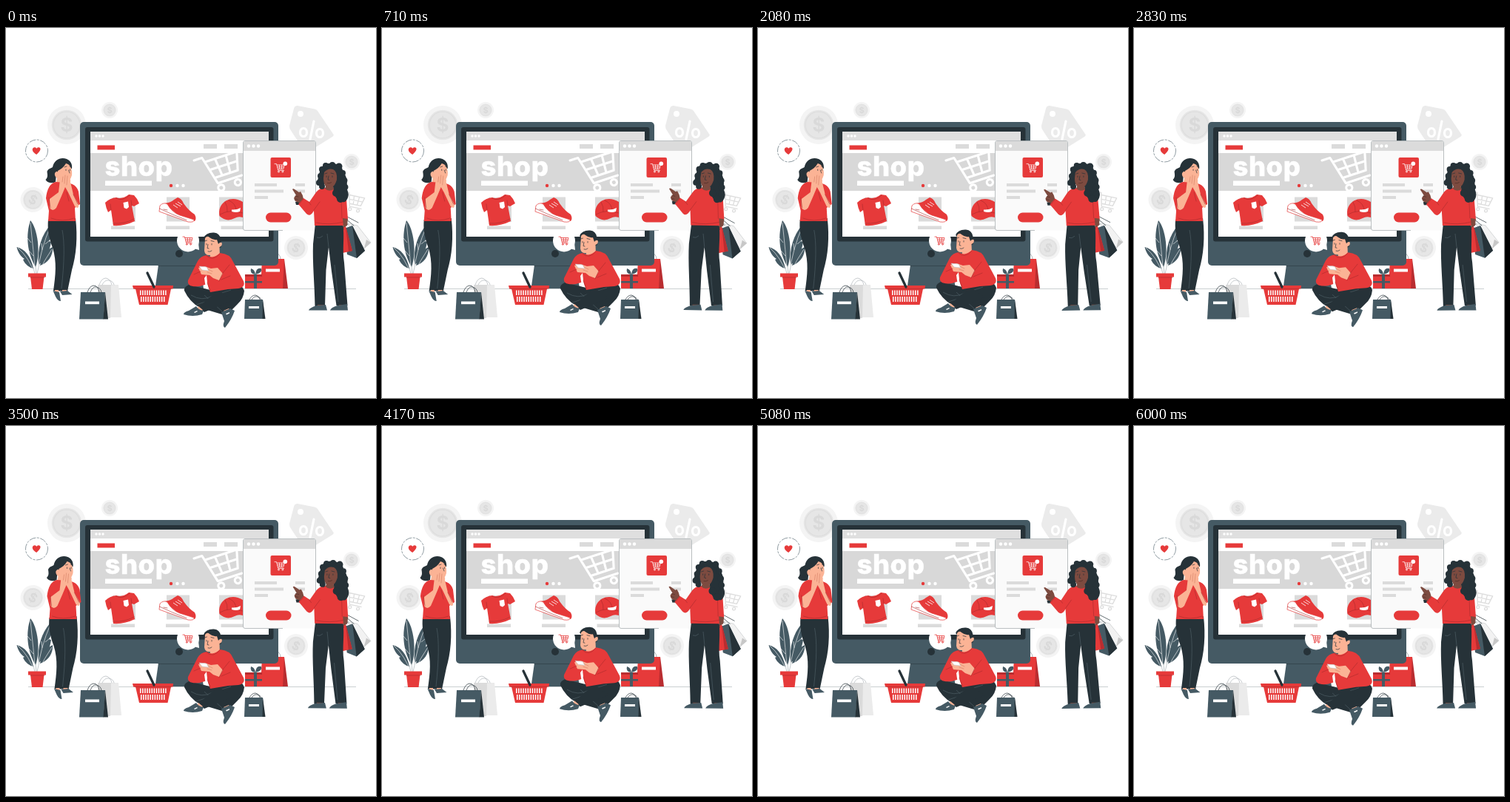
Recreate the animation shown at these times as an HTML page. Size 500 by 500 pixels, loop 6040 ms.

```html
<!DOCTYPE html>
<html lang="en">
<head>
<meta charset="utf-8">
<title>Online shop</title>
<style>
  html, body { margin: 0; width: 100%; height: 100%; overflow: hidden; background: #fff; }
  svg { display: block; width: 100%; height: 100%; }
  .red { fill: #e63a3a; } .deep { fill: #b92d30; } .slate { fill: #455a64; } .dark { fill: #263238; }
  .pale { fill: #ebebeb; } .grey { fill: #dbdbdb; } .white { fill: #fff; }
  .skin { fill: #fbb395; } .brown { fill: #7d4b40; }
  .line { fill: none; stroke: #263238; stroke-width: .7; stroke-linecap: round; stroke-linejoin: round; }
  .fold { fill: none; stroke: #a92a2d; stroke-width: .6; stroke-linecap: round; }
  .seam { fill: none; stroke: #52636b; stroke-width: .6; }
  .thin { fill: none; stroke: #fff; stroke-width: .8; }
  .coin { font: 700 10px Inter, Arial, sans-serif; text-anchor: middle; fill: #d9d9d9; }
  .shop { font: 800 36.500px Inter, "Open Sans", sans-serif; letter-spacing: .5px; fill: #fff; stroke: #fff; stroke-width: .4; }
</style>
</head>
<body>
<svg viewBox="0 0 500 500" xmlns="http://www.w3.org/2000/svg">
  <defs>
    <g id="coin">
      <circle r="10" fill="#f4f4f4"/><circle r="7.8" fill="#e6e6e6"/>
      <circle r="6.9" fill="none" stroke="#dedede" stroke-width=".5"/>
      <text class="coin" y="3.6">$</text>
    </g>
    <g id="cart" fill="none" stroke-linecap="round" stroke-linejoin="round">
      <path d="M0 3H7L13 27H34M8 7H36L32 22H12M17 7l1.5 15M26.5 7l-1 15M10 14.5H34"/>
      <circle cx="14.500" cy="31.500" r="2.500"/><circle cx="29" cy="31.500" r="2.500"/>
    </g>
  </defs>

  <!-- backdrop -->
  <use href="#coin" transform="translate(82 131) scale(2.6)"/>
  <use href="#coin" transform="translate(140 111) scale(1.1)"/>
  <use href="#coin" transform="translate(36.500 232) rotate(28) scale(1.7)"/>
  <use href="#coin" transform="translate(467 181) scale(1.1)"/>
  <use href="#coin" transform="translate(392 297) rotate(25) scale(1.6)"/>
  <path class="pale" d="M394 105L417 109.500Q420 110 421 112L442 143Q444 145 441 147L409 167Q405 169 403 166L384 137Q383 135 383 132L389 109Q390 105 394 105Z"/>
  <circle class="white" cx="398" cy="116" r="4"/>
  <g fill="none" stroke="#fff" stroke-width="3.2" stroke-linecap="round">
    <ellipse cx="402" cy="141" rx="4.5" ry="5.5"/><ellipse cx="424" cy="142" rx="4.5" ry="5.5"/><path d="M416 126L411 150"/>
  </g>
  <use href="#cart" transform="translate(459 219) rotate(12) scale(.76)" stroke="#dedede" stroke-width="1.8"/>
  <path d="M30 352.5H473" stroke="#b4babd" stroke-width=".7"/>

  <path class="line" d="M356 312Q358 304 364 304Q370 304 371 312" style="stroke:#8b9498"/>
  <path class="red" d="M346 312H376V352H344Z"/><path class="deep" d="M376 312L381 352H374Z"/>
  <rect class="white" x="351" y="325.5" width="19" height="4"/>

  <!-- monitor -->
  <path class="slate" d="M206 320H262L267 352H201.500Z"/><path class="line" d="M206 321.200H262"/>
  <rect class="slate" x="100" y="127" width="268" height="194" rx="5"/>
  <rect class="dark" x="107" y="134" width="254.500" height="154.500" rx="3"/>
  <rect class="white" x="114" y="140" width="241" height="142"/>
  <rect x="114" y="140" width="241" height="12" fill="#dfdfdf"/>
  <g class="white"><circle cx="122" cy="146" r="1.7"/><circle cx="126.5" cy="146" r="1.7"/><circle cx="131" cy="146" r="1.7"/></g>
  <rect class="red" x="123.5" y="158.500" width="23.5" height="6"/>
  <path class="grey" d="M267 157h18v6h-18zM295 157h18v6h-18z"/>
  <path d="M114 169H355V220H114Z" fill="#d8d8d8"/>
  <text class="shop" x="133.500" y="200">shop</text>
  <rect class="white" x="134" y="206.5" width="63" height="6.5"/>
  <circle class="red" cx="223" cy="213" r="2.2"/>
  <circle class="white" cx="231.5" cy="213" r="2.2"/><circle class="white" cx="239.5" cy="213" r="2.2"/>
  <use href="#cart" transform="translate(254 179) rotate(-18) scale(1.63) translate(0 -3)" stroke="#fff" stroke-width="1.9"/>
  <circle class="dark" cx="234" cy="305" r="5"/>

  <!-- products -->
  <path class="grey" d="M144 229h31v33h-31zM217 228.5h31v33h-31zM288 228.5h32v33h-32zM142 267.5h32v4.5h-32zM216 267.5h32v4.5h-32zM290.5 267.5h31v4.5h-31z"/>
  <path class="red" d="M149 229Q157 232 166 225L173 226Q178 231 180 237L173 241L170 240L174 261Q160 268 145 267L142 246L138 249Q135 243 134 236Q140 230 149 229Z"/>
  <path class="fold" d="M149 230Q158 235 167 226M142 246L141 238M170 240L169 233M145 264Q161 265 173 258"/>
  <path class="white" d="M158.5 236L165 234.5L166 242L163 244.5L159.5 243Z"/>
  <path class="red" d="M214 237Q223 236 227 232L232 229Q237 230 240 237Q247 247 255 252Q258 258 255 261L236 256Z"/>
  <path class="white" d="M208 240Q213 235 218 238Q224 249 235 253L254 259Q255 263 246 262L207 248Z" stroke="#e63a3a" stroke-width=".7"/>
  <path class="fold" d="M207.500 244Q224 252 244 259.500M213 245l5 1"/>
  <path class="thin" d="M226 239l6 4M229 237l7 4M232 235l6 4"/>
  <path class="red" d="M288.500 254Q286 241 297 233.500Q308 228 320 235V256Q314 254 309 257Q298 263 288.500 254Z"/>
  <path class="fold" d="M289 252Q303 244 320 250M301 233Q311 237 311 247M296 235Q300 242 299 248"/>
  <path class="white" d="M305 245.500Q312 246 317 243L316 248Q311 250 305 248Z"/>

  <!-- pop-up window -->
  <rect x="320.5" y="152.5" width="98.5" height="121" rx="3" fill="#fafafa"/>
  <path d="M374 273.500H323Q320.500 273.500 320.500 271V155Q320.500 152.500 323 152.500H416Q418.500 152.500 418.500 155V260" fill="none" stroke="#aab0b3" stroke-width=".8"/>
  <path class="grey" d="M321 166V155Q321 153 323 153H416Q418 153 418 155V166Z"/>
  <g class="white"><circle cx="328" cy="159.5" r="2.2"/><circle cx="334.5" cy="159.5" r="2.2"/><circle cx="341" cy="159.5" r="2.2"/></g>
  <rect class="red" x="357.500" y="175" width="27.500" height="27" rx="2"/>
  <use href="#cart" transform="translate(363 182.500) scale(.37)" stroke="#fff" stroke-width="2"/>
  <circle class="white" cx="377.3" cy="183.300" r="2.800"/>
  <path class="grey" d="M336 210h30v4h-30zM391 210h13v4h-13zM336 218.5h39v4h-39zM391 218.5h13v4h-13zM336 227h18v4h-18z"/>
  <rect class="red" x="351" y="249.5" width="34.5" height="13" rx="6.5"/>

  <!-- speech bubbles -->
  <circle class="white" cx="246" cy="287.5" r="15"/><path class="white" d="M254 298L261 300L260 290Z"/>
  <use href="#cart" transform="translate(239 281) scale(.36)" stroke="#e63a3a" stroke-width="2.2"/>
  <circle class="white" cx="41.5" cy="166" r="15" stroke="#455a64" stroke-width=".6" stroke-dasharray="9 1.500 3 1.500"/>
  <path class="red" d="M41.300 171C36.500 168.500 34.500 164.500 36.500 162.300Q39 160 41.300 162.700Q44 160 46.200 162.300Q48 165 41.300 171Z"/>

  <!-- plant -->
  <g class="slate">
    <path d="M40 323C29 305 26 281 33 260C43 272 47 303 40 323Z"/>
    <path d="M44 320C42 298 48 279 61 265C63 274 62 282 58 288L61 289C59 302 54 313 44 320Z"/>
    <path d="M37 325C32 324 26 320 23 313L25 312C20 309 16 303 14.500 296C25 298 34 309 37 325Z"/>
    <path d="M46 321C48 309 54 300 63 296C64 308 56 318 46 321Z"/>
  </g>
  <path d="M40 333Q37 301 33 263M42 333Q47 298 60 268M39 333Q31 310 16 297M43 333Q52 313 62 299M34 290l-5-6M37 308l-6-7M49 300l-1-9M53 292l6-5" fill="none" stroke="#fff" stroke-width=".6"/>
  <path class="line" d="M41 332L40 322M42 332L45 319M39 332L37 324" style="stroke:#a9b4b8"/>
  <path class="red" d="M33 336H51.500L49.500 353H35Z"/><path class="red" d="M30 331.5H54V336.5H30Z"/><path class="fold" d="M33 337H52"/>

  <!-- bags, basket and gift -->
  <path class="pale" d="M126 347H152L156 391H130Z"/><path class="grey" d="M124 347H142L141 392H125Z"/>
  <path class="line" d="M126 347Q129 338 135 338Q141 339 143 347M130 347Q133 340 139 341Q145 342 146 347" style="stroke:#b0b7ba"/>
  <path class="slate" d="M101 357H134L132 393.500H99Z"/><path class="dark" d="M134 357L138 393.500H131.5Z"/>
  <path class="line" d="M110 357Q113 348 119 348Q125 349 126 357M114 357Q117 349 122 350Q128 351 129 357"/>
  <rect class="white" x="107" y="369.5" width="19" height="3.7"/>

  <path class="red" d="M171 348H226L225.5 352.5H223L218.500 374H180L175 352.5H172Z"/>
  <path class="fold" d="M174 352.5H223"/>
  <g fill="none" stroke="#fff" stroke-dasharray="1.500 1.600">
    <path d="M181 357.700H217" stroke-width="6.500"/><path d="M182 366.500H216" stroke-width="7"/>
  </g>
  <path d="M191 331L200 350" stroke="#263238" stroke-width="3.3" stroke-linecap="round"/>

  <path class="red" d="M323 333H346V352H323Z"/><path class="deep" d="M323 333H346V336H323Z"/>
  <path class="slate" d="M335 333h4v19h-4zM323 342h23v2.5h-23z"/>
  <path class="slate" d="M337 333Q329 332 331 325Q336 326 337 333Q338 323 345 325Q347 331 337 333Z"/>

  <path class="slate" d="M323 367H347L349 393H322Z"/><path class="dark" d="M347 367L350.5 393H346.5Z"/>
  <path class="line" d="M329 367Q332 361 337 361Q342 362 343 367M332 367Q335 362 340 363Q344 364 345 367"/>
  <rect class="white" x="328" y="376" width="14" height="3"/>

  <g id="thinker">
    <path class="dark" d="M62 188C64 178 73 174 81 177C86 179 89 184 88 190L72 192L67 197L66 208C62 210 55 210 52.500 205C56 202 55 198 54.500 194C56 190 59 190 62 188Z"/>
    <path class="skin" d="M69 193C73 191 77 188 80 183C86 184 89 191 88 199Q86 207 79 208L79 214L66 214L68 203Q64 200 65 196Q68 192 69 195Z"/>
    <path class="line" d="M78 188l3-1M85 187l2 1M80 191v1.500M85.500 191v1.500M83.500 192l1.500 4"/>
    <path class="dark" d="M56 259L93 257C96 283 94 307 88 327L82 356L63 355C66 334 68 316 62 297C56 281 55 270 56 259Z"/>
    <path class="seam" d="M75 273Q80 298 74 352"/>
    <path class="skin" d="M65 354h5v3h-5zM75 354h6v3h-6z"/>
    <path class="slate" d="M62.500 355L71 357L73 369Q69 369 66 363ZM72 356L82 355L88.500 360L75 361Z"/>
    <path class="red" d="M66 208L80 209Q94 210 97 221L99 238L92 243L93 261H56L57 247L53 230Q55 211 66 208Z"/>
    <path class="skin" d="M58 231L70 222L72 205Q74 197 79 198L82 199Q87 203 86 208L90 225L97 238Q98 246 92 241L83 222L79 215L74 227L67 243Q62 249 58 243Z"/>
    <path class="line" d="M76 201L75 208M79 199L78 210M82 200L81 212" style="stroke:#d9856a"/>
    <path class="fold" d="M57 229L59 243M90 225L96 238M60 257Q75 263 91 257M81 222L84 234"/>
  </g>

  <g id="reader">
    <path class="dark" d="M267 284Q270 276 281 276.500Q289 277 290.500 286L291 296L287 298L283 288Q277 287 273 282L269 286Z"/>
    <path class="skin" d="M269 284Q272 280 275 283Q280 287 285 286L287 292Q289 289 291.500 290Q293 294 288.500 296L289 309L275 312L276 307Q269 308 268 301Z"/>
    <path class="line" d="M268.500 288l3-1M277 287.500l4 1M271 291.500v1.500M278 291.500v1.500M273 292.500l-1 5 2 .5M273 302q3 1 5-1"/>
    <path class="dark" d="M247 347Q240 350 241 355Q248 370 262 378L292 387L302 384L313 373Q321 366 322 355Q320 345 302 347L276 354Z"/>
    <path class="seam" d="M250 361Q265 370 279 362L304 354M257 374L285 365M268 361L292 383"/>
    <path class="dark" d="M287 354L260 377L268 384L306 368Z"/>
    <path class="skin" d="M260 376l6 5-3 2-5-4zM294 382l7-3 2 3-6 4z"/>
    <path class="slate" d="M257 376Q260 381 267 382L265 387Q252 391 240 387Q240 384 247 382ZM291 384L303 379L309 382Q305 394 296 405Q292 404 295 396Z"/>
    <path class="white" d="M254 384l4-2 1 1-4 2zM297 386l5-2v1.500l-4 2z"/>
    <path class="red" d="M271 307Q280 313 289 304Q303 305 307 316L321 342Q324 350 314 352L300 353L276 357L272 346L262 349Q244 351 246 341L259 315Q263 308 271 307Z"/>
    <path class="white" d="M268 338L271 334L273 353L270 352Z"/>
    <path class="skin" d="M260 324L268 322L277 325L286 324L293 332L288 341L280 338L275 334L264 333Z"/>
    <path class="white" d="M261 322L271 323L274 328L265 327Z" stroke="#b7bfc3" stroke-width=".5"/>
    <path class="line" d="M273 326l6 3M272 330l6 2" style="stroke:#d9856a"/>
    <path class="fold" d="M293 331L288 342M302 320L293 331M303 335L291 340M272 344L276 355M271 308Q280 316 289 305M254 333L263 329"/>
  </g>

  <g id="shopper">
    <path d="M462 264L475 267L493 290L484 298Z" fill="#f2f2f2" stroke="#b5b9bb" stroke-width=".5"/><path d="M484 298L493 290L487 286Z" fill="#c7c7c7"/>
    <path class="slate" d="M457 271L468 267L485 301L474 311L461 306Z"/><path class="dark" d="M468 267L485 301L474 311Z"/>
    <path class="red" d="M452 268L459 268L468 301L455 304Z"/><path class="deep" d="M459 268L468 301L463 302Z"/>
    <path class="line" d="M456 272Q452 258 458 257L470 267M462 266Q455 256 461 255L476 263"/>
    <path class="dark" d="M418 264H455C458 283 454 299 457 317L461.500 375H446.500L440 329L436 296L432.500 327L431 376H417.500C417 345 414 317 415 292Z"/>
    <path class="seam" d="M436 296L434 278M444 320L449 370M420 283Q424 285 428 281"/>
    <path class="brown" d="M421 374h9v3h-9zM450 374h9v3h-9z"/>
    <path class="slate" d="M420 375L432 374L434 381.5H409Q410 378 420 375ZM448 375L461 373L462 381.5H438Q439 378 448 375Z"/>
    <path class="dark" d="M391 235L398 234L400 239H392Z"/>
    <path class="brown" d="M387 218Q388 216.500 390 218L396 222L398 221Q401 225 402 231L398 237L391 234Q388 230 390 228L392 226Z"/>
    <path class="line" d="M391 227l4 1M391 231l3 1" style="stroke:#53302a"/>
    <path class="red" d="M429 216L447 216Q459 219 460 231L462 258L457 267H417L416 247Q411 256 406 251L395 238L402 230L410 235L419 222Q423 217 429 216Z"/>
    <path class="brown" d="M455 257L462 258L461 267L456 270Z"/>
    <path class="fold" d="M416 246L424 235M397 237L402 231M453 232L454 257M419 263Q437 267 456 262M409 235L412 239"/>
    <!-- curls -->
    <g class="dark">
      <path d="M425 190Q430 181 443 183Q454 184 456 195Q463 204 460 216Q466 228 458 235Q447 237 443 222L441 207L427 212Q417 215 421 206Z"/>
      <circle cx="427" cy="191" r="4"/><circle cx="425" cy="200" r="4"/><circle cx="423" cy="209" r="4"/><circle cx="427" cy="214" r="4"/>
      <circle cx="432" cy="186" r="4"/><circle cx="441" cy="185" r="4"/><circle cx="450" cy="187" r="4.500"/><circle cx="455" cy="196" r="4"/>
      <circle cx="457" cy="206" r="4.500"/><circle cx="458" cy="215" r="4.500"/><circle cx="458" cy="225" r="4.500"/><circle cx="452" cy="231" r="5"/><circle cx="446" cy="223" r="5"/>
    </g>
    <path class="brown" d="M430 195Q435 189 442 191Q448 194 447 205Q445 212 442 214L443 218Q436 222 431 217L432 214Q429 210 429 203Z"/>
    <path class="line" d="M431 197l3-1M439 196l4 1M433 200v1.500M441 200v1.500M436 200l-1 5 2 .6"/>
    <path d="M434 209.500q3 1 6-1" fill="none" stroke="#53302a" stroke-width=".8"/>
  </g>
</svg>
<script>
  const LOOP = 6040;
  const thinker = document.getElementById('thinker');
  const reader = document.getElementById('reader');
  const shopper = document.getElementById('shopper');

  const SHAKE = [0, -1, 2, -4, 4, -4, 4, -4, 2, -1, 0];
  const FLOAT = [0, -6.3, 0];
  const WIND = [0, 1, 0, -1, 0];

  // Linear interpolation over evenly spaced keys.
  function track(keys, phase) {
    const position = phase * (keys.length - 1);
    const i = Math.floor(position);
    return keys[i] + (keys[i + 1] - keys[i]) * (position - i);
  }

  function draw(time) {
    const phase = (time % LOOP) / LOOP;
    const half = (phase * 2) % 1;
    thinker.setAttribute('transform', `translate(${1 + track(SHAKE, phase) * 0.63} 0)`);
    reader.setAttribute('transform', `translate(0 ${track(FLOAT, half)})`);
    shopper.setAttribute('transform', `rotate(${track(WIND, half)} 440 281)`);
  }

  const start = performance.now();
  function tick() {
    draw(performance.now() - start);
    requestAnimationFrame(tick);
  }
  tick();
</script>
</body>
</html>
```
